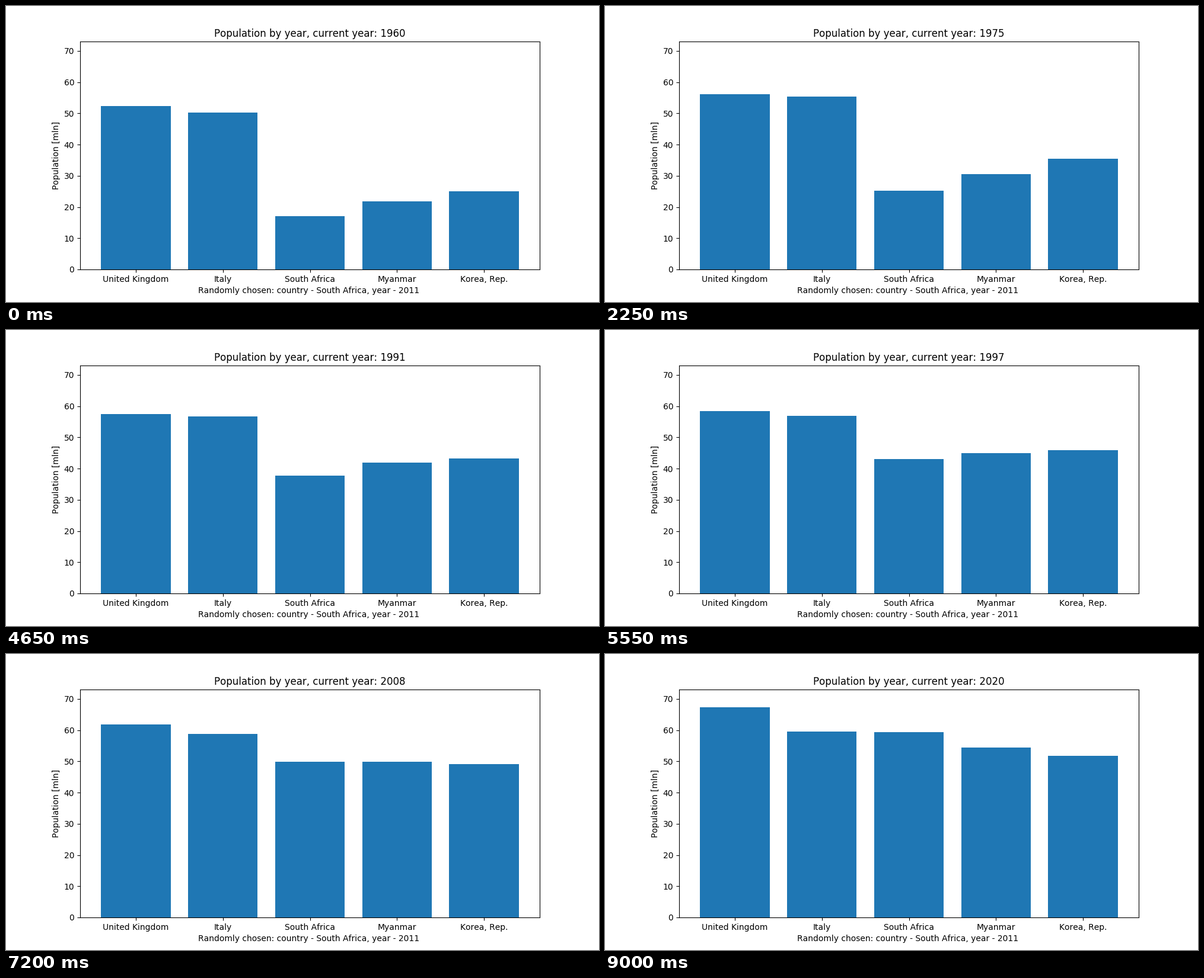
Animation of 1000 by 500 pixels, one loop 9.15 s. Source, as a matplotlib script:

```python
import matplotlib.pyplot as plt
import numpy as np
from matplotlib.animation import FuncAnimation

# Letters spaced by plain advance widths, without pair kerning
plt.rcParams["text.kerning_factor"] = 6

FIRST, LAST = 1960, 2020

# Population in millions at a few key years, joined by smooth curves
KEY_YEARS = [1960, 1970, 1981, 1991, 1997, 2003, 2008, 2014, 2020]
KEY_VALUES = {
    "United Kingdom": [52.4, 55.66, 56.33, 57.42, 58.32, 59.65, 61.81, 64.6, 67.23],
    "Italy": [50.2, 53.82, 56.5, 56.76, 56.89, 57.31, 58.83, 60.79, 59.55],
    "South Africa": [17.1, 22.07, 29.33, 37.72, 42.99, 46.72, 49.78, 54.54, 59.31],
    "Myanmar": [21.74, 27.2, 34.9, 41.88, 44.98, 48.15, 49.93, 52.28, 54.41],
    "Korea, Rep.": [25.01, 32.24, 38.72, 43.3, 45.95, 47.89, 49.06, 50.75, 51.78],
}


def smooth(x, keys, values):
    """Cubic Hermite curve through the key points."""
    keys, values = np.array(keys), np.array(values)
    slopes = np.gradient(values, keys, edge_order=2)
    k = np.clip(np.searchsorted(keys, x, side="right") - 1, 0, len(keys) - 2)
    span = keys[k + 1] - keys[k]
    t = (x - keys[k]) / span
    ease = t * t * (3 - 2 * t)
    bend = t * (1 - t) * ((1 - t) * slopes[k] - t * slopes[k + 1])
    return values[k] + ease * (values[k + 1] - values[k]) + span * bend


years = np.arange(FIRST, LAST + 1)
heights = np.array([smooth(years, KEY_YEARS, v) for v in KEY_VALUES.values()])

fig, ax = plt.subplots(figsize=(10, 5), dpi=100)
bars = ax.bar(list(KEY_VALUES), heights[:, 0], color="#1f77b4")
ax.set_ylim(0, 73)
ax.set_ylabel("Population [mln]")
ax.set_xlabel("Randomly chosen: country - South Africa, year - 2011 ")
title = ax.set_title("")


def update(i):
    for bar, height in zip(bars, heights[:, i]):
        bar.set_height(height)
    title.set_text(f"Population by year, current year: {years[i]}")
    return [*bars, title]


anim = FuncAnimation(fig, update, frames=len(years), interval=150,
                     repeat=True, blit=False)
plt.show()
```
